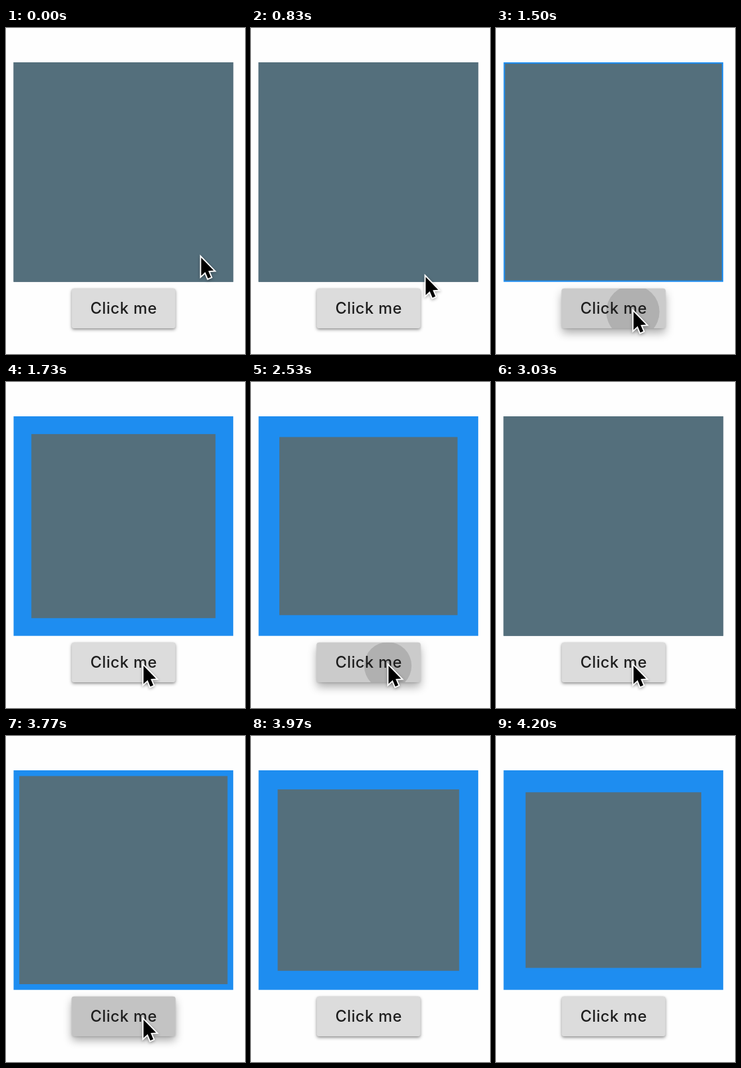
Recreate the animation shown at these times as an HTML page with a canvas. Size 362 px wide and 494 px high, loop 4.83 s.

```html
<!DOCTYPE html>
<html lang="en">
<head>
<meta charset="utf-8">
<title>Animated border</title>
<style>
html, body { margin: 0; width: 100%; height: 100%; overflow: hidden; background: #fefefe; }
canvas { display: block; }
</style>
</head>
<body>
<canvas id="stage" width="362" height="494"></canvas>
<script>
const ctx = document.getElementById('stage').getContext('2d');
const LOOP = 4830;
const BOX = { x: 11.5, y: 52, size: 332.7 };
const BUTTON = { x: 99.6, y: 394.7, w: 157, h: 60.2, r: 3.4 };
const BORDER = 33.3;
const GROW = 605;
const CLICKS = [1412, 2446, 3614];
const HIDE_CURSOR = 3950;
const ARROW = [[0, 0], [0, 27.5], [6.2, 21.8], [10.3, 31.5], [14.8, 29.6], [10.8, 20], [19, 19.6]];

const clamp = v => Math.min(1, Math.max(0, v));
const ramp = (t, a, b) => clamp((t - a) / (b - a));
const mix = (a, b, k) => a + (b - a) * k;
const pulse = (t, a, b, c, d) => ramp(t, a, b) * (1 - ramp(t, c, d));
const smooth = k => k * k * (3 - 2 * k);

// cubic-bezier(.4, 0, .2, 1)
function standardEase(x) {
  if (x <= 0 || x >= 1) return clamp(x);
  let lo = 0, hi = 1, u = 0.5;
  for (let i = 0; i < 24; i++) {
    u = (lo + hi) / 2;
    const v = 1 - u;
    if (1.2 * v * v * u + 0.6 * v * u * u + u * u * u < x) lo = u;
    else hi = u;
  }
  return 3 * (1 - u) * u * u + u * u * u;
}

function borderAt(t) {
  const [a, b, c] = CLICKS.map(s => standardEase((t - s) / GROW));
  return BORDER * (a - b + c);
}

function drawBox(t) {
  const w = borderAt(t), { x, y, size } = BOX;
  ctx.fillStyle = w > 0.05 ? '#1e8df0' : '#546f7c';
  ctx.fillRect(x, y, size, size);
  ctx.fillStyle = '#546f7c';
  ctx.fillRect(x + w, y + w, size - 2 * w, size - 2 * w);
}

function buttonPath() {
  ctx.beginPath();
  ctx.roundRect(BUTTON.x, BUTTON.y, BUTTON.w, BUTTON.h, BUTTON.r);
}

function shadowed(alpha, blur, dy, draw) {
  ctx.save();
  ctx.shadowColor = `rgba(0,0,0,${alpha})`;
  ctx.shadowBlur = blur;
  ctx.shadowOffsetY = dy;
  draw();
  ctx.restore();
}

function drawButton(t) {
  const start = CLICKS.filter(s => t >= s - 60).pop() ?? Infinity;
  const dt = start === Infinity ? -1000 : t - start;
  const lift = pulse(dt, -40, 80, 130, 310);

  buttonPath();
  ctx.fillStyle = '#dcdcdc';
  shadowed(mix(0.36, 0.32, lift), mix(5, 14, lift), mix(2.4, 7, lift), () => ctx.fill());
  shadowed(0.14, 3, 1, () => ctx.fill());

  const glow = 0.077 * pulse(dt, -30, 80, 90, 220);
  ctx.fillStyle = `rgba(0,0,0,${glow})`;
  ctx.fill();

  const radius = 37 + 1.1 * (dt - 86);
  const ink = 0.133 * (1 - ramp(dt, 90, 250));
  if (radius > 0 && ink > 0) {
    ctx.save();
    ctx.clip();
    ctx.beginPath();
    ctx.arc(207.3, 430, radius, 0, 2 * Math.PI);
    ctx.fillStyle = `rgba(0,0,0,${ink})`;
    ctx.fill();
    ctx.restore();
  }

  ctx.font = '500 23.6px Inter, Roboto, sans-serif';
  ctx.letterSpacing = '0.5px';
  ctx.textAlign = 'center';
  ctx.fillStyle = '#1e1e1e';
  ctx.fillText('Click me', 178.2, 433);
}

function drawCursor(t) {
  if (t >= HIDE_CURSOR) return;
  const k = smooth(ramp(t, 670, 1070));
  ctx.save();
  ctx.translate(mix(295.6, 208.3, k), mix(348, 430, k));
  ctx.beginPath();
  ARROW.forEach(([x, y]) => ctx.lineTo(x, y));
  ctx.closePath();
  ctx.lineWidth = 3.8;
  ctx.lineJoin = 'miter';
  ctx.strokeStyle = '#fff';
  shadowed(0.35, 4, 1.5, () => ctx.stroke());
  ctx.fillStyle = '#000';
  ctx.fill();
  ctx.restore();
}

function draw(t) {
  ctx.fillStyle = '#fefefe';
  ctx.fillRect(0, 0, 362, 494);
  drawBox(t);
  drawButton(t);
  drawCursor(t);
}

const begin = performance.now();
function tick() {
  draw((performance.now() - begin) % LOOP);
  requestAnimationFrame(tick);
}
tick();
</script>
</body>
</html>
```
